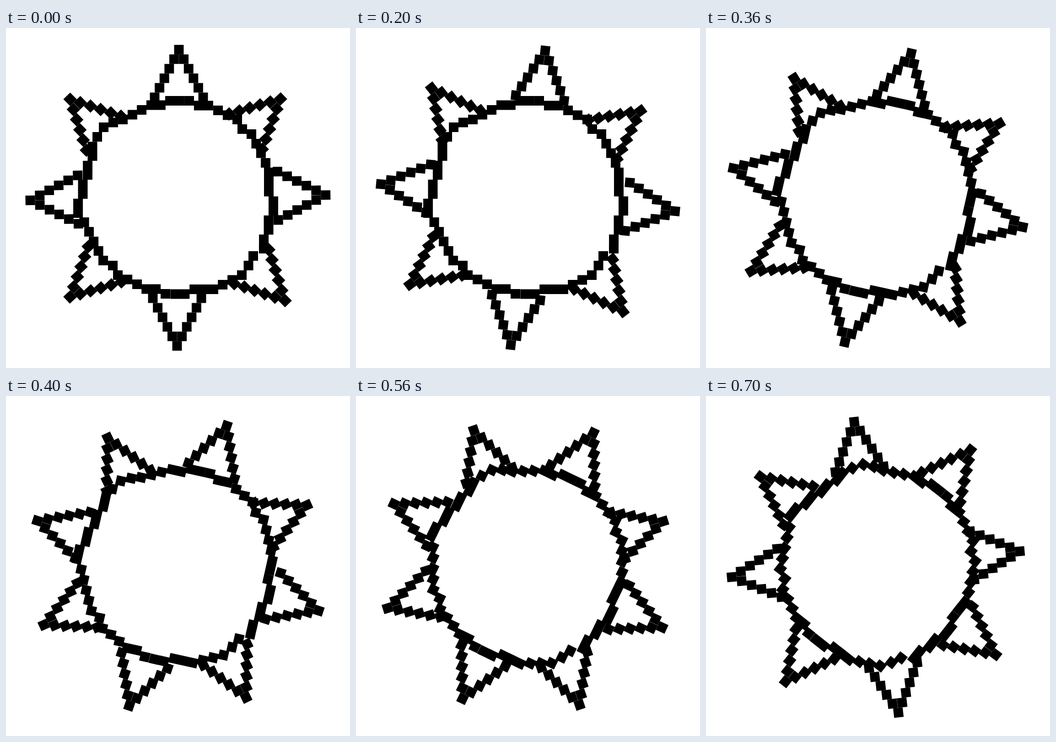
An HTML page with a canvas for the animation above (0.8 s loop, 752 by 745 pixels).

```html
<!DOCTYPE html>
<html>
<head>
<meta charset="utf-8">
<style>
html, body { margin: 0; height: 100%; overflow: hidden; background: #fff; }
canvas { display: block; }
</style>
</head>
<body>
<canvas id="stage" width="752" height="745"></canvas>
<script>
const ctx = document.getElementById('stage').getContext('2d');
const UNIT = 20.9, HALF = UNIT / 2;
const RAD = Math.PI / 180;
const CENTER = [376, 372];

// Ring poses in degrees; the rays take an extra half step between them
const POSES = [0, 12.53, 25.8, 38.2];
const HALF_STEP = 6.28;

// Ray tips clockwise from the top; opposite rays share a lean
const TIPS = [
  [378, 47.4], [600, 155.4], [698.8, 366], [610, 597.3],
  [374, 696.6], [140, 589.2], [53, 377.6], [140.2, 156.2]
];
const LEANS = [0, 46.8, 89.1, 135.4];

// Block corners where the ring changes slope
const BENDS = [
  [348, 149], [390, 149], [453, 170], [495, 190], [506, 211], [526, 222], [557, 285],
  [564, 306], [564, 348], [574, 369], [553, 473], [530, 489], [505, 531], [443, 562],
  [338, 572], [276, 551], [234, 531], [223, 510], [202, 499], [171, 436],
  [147, 395], [168, 291], [189, 228], [203, 207], [245, 190], [286, 169]
];

// Walks one unit at a time along the longer axis, snapping the other to half units
function buildRing() {
  const path = new Path2D();
  const snap = d => Math.round(d / HALF) * HALF;
  BENDS.forEach(([x, y], i) => {
    const [nextX, nextY] = BENDS[(i + 1) % BENDS.length];
    const dx = nextX - x, dy = nextY - y;
    const count = Math.round(Math.max(Math.abs(dx), Math.abs(dy)) / UNIT);
    for (let k = 0; k < count; k++)
      path.rect(x + snap(dx * k / count), y + snap(dy * k / count), UNIT + .1, UNIT + .1);
  });
  return path;
}

function place(x, y, degrees, draw) {
  ctx.save();
  ctx.translate(x, y);
  ctx.rotate(degrees * RAD);
  draw();
  ctx.restore();
}

function turned(degrees, draw) {
  place(...CENTER, degrees, () => {
    ctx.translate(-CENTER[0], -CENTER[1]);
    draw();
  });
}

function block(x, y) {
  ctx.fillRect(x - HALF, y - HALF, UNIT, UNIT);
}

function drawRay() {
  block(0, 0);
  for (let i = 1; i < 6; i++)
    for (const side of [-1, 1]) block(side * i * 10.6, i * UNIT);
}

const ring = buildRing();

function render() {
  const step = Math.max(0, Math.floor(performance.now() % 800 / 100) - 1);
  const pose = POSES[step >> 1];
  ctx.clearRect(0, 0, 752, 745);
  turned(pose, () => ctx.fill(ring));
  turned(pose + step % 2 * HALF_STEP, () => TIPS.forEach(([x, y], i) =>
    place(x, y, LEANS[i % 4] + (i > 3 ? 180 : 0), drawRay)));
  requestAnimationFrame(render);
}
render();
</script>
</body>
</html>
```
